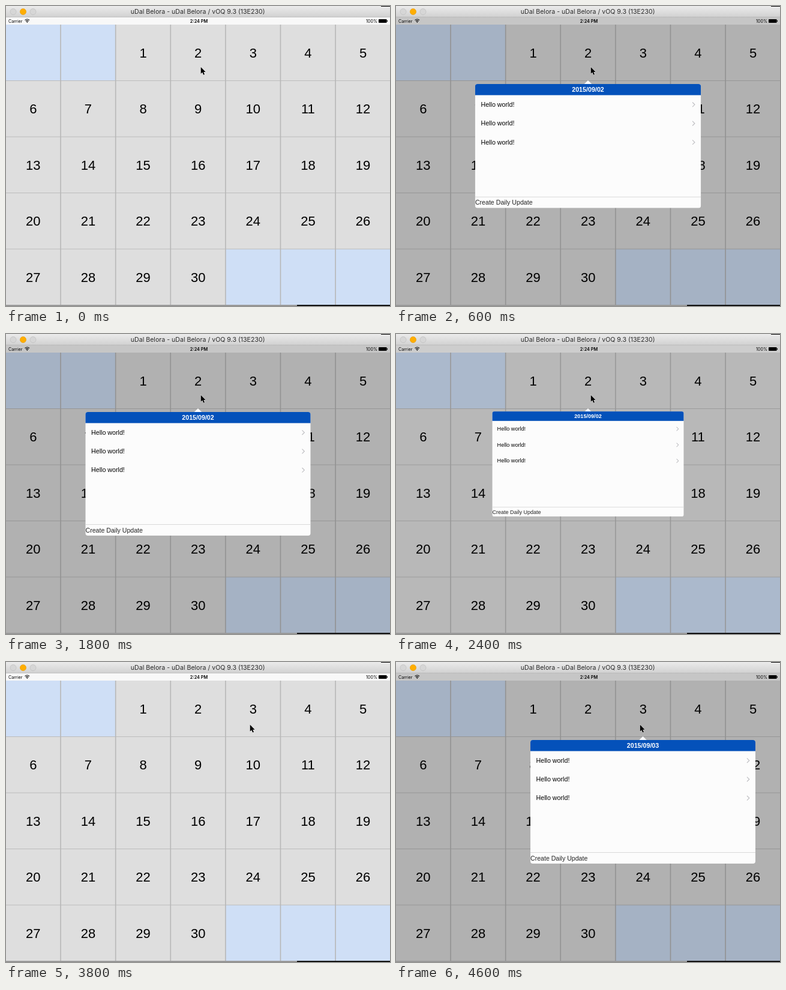
These frames come from a looping animation (640x500 px, 4.8 s). An HTML page:

```html
<!DOCTYPE html>
<html lang="en">
<head>
<meta charset="utf-8">
<title>Calendar popover</title>
<style>
  html, body { margin: 0; width: 100%; height: 100%; overflow: hidden; background: #dedede; }
  svg { display: block; }
  text { font-family: "Liberation Sans", Arial, sans-serif; }
  .ui { font-family: Inter, sans-serif; }
  .mid { text-anchor: middle; }
</style>
</head>
<body>
<svg width="640" height="500" viewBox="0 0 640 500">
  <defs>
    <linearGradient id="bar" x2="0" y2="1">
      <stop stop-color="#ebebeb"/><stop offset="1" stop-color="#d1d1d1"/>
    </linearGradient>
    <clipPath id="card"><rect x="-187.5" y="6" width="375" height="206" rx="4"/></clipPath>
  </defs>

  <g id="calendar"></g>

  <g id="status">
    <rect y="18" width="640" height="13" fill="#f8f8f8"/>
    <text class="ui" x="4" y="27.6" font-size="7.2">Carrier</text>
    <g fill="none" stroke="#000" stroke-width="1.2">
      <path d="M31.5 23.6Q35.3 20.4 39.1 23.6M33 25.4Q35.3 23.4 37.6 25.4"/>
    </g>
    <path d="M34 26.6Q35.3 25.5 36.6 26.6L35.3 28.1Z"/>
    <text class="ui mid" x="321.5" y="27.7" font-size="7.3" font-weight="600">2:24 PM</text>
    <text class="ui" x="619" y="27.6" font-size="7.2" text-anchor="end">100%</text>
    <rect x="621" y="22" width="13.6" height="6" rx="1"/>
    <rect x="635" y="23.8" width="1" height="2.4"/>
  </g>

  <rect id="dim" y="18" width="640" height="480"/>

  <g id="title">
    <rect width="640" height="18.5" fill="url(#bar)"/>
    <path d="M0 18.4H640" stroke="#b4b4b4" stroke-width=".7"/>
    <g fill="#d6d6d6" stroke="#bdbdbd" stroke-width=".7">
      <circle cx="12" cy="9.5" r="5"/>
      <circle cx="28.5" cy="9.5" r="5" fill="#ffae00" stroke="#e79a00"/>
      <circle cx="45" cy="9.5" r="5"/>
    </g>
    <text class="ui mid" x="319.7" y="13.4" font-size="10.6" fill="#2b2b2b">uDal Belora - uDal Belora / vOQ 9.3 (13E230)</text>
    <path d="M625 0H640V1H625Z"/>
  </g>
  <path d="M0 498H640V500H0Z" fill="#999"/>
  <path d="M485 498H640V500H485Z" fill="#111"/>

  <g id="popover">
    <path d="M-6.5 6.2L0 0L6.5 6.2Z" fill="#fcfcfc"/>
    <g clip-path="url(#card)">
      <rect x="-188" y="6" width="376" height="206" fill="#fcfcfc"/>
      <rect x="-188" y="6" width="376" height="18.5" fill="#0451ba"/>
      <path d="M-188 193.5H188" stroke="#d9d9d9"/>
    </g>
    <text id="date" class="mid" y="19.3" font-size="10.7" font-weight="700" fill="#fff"></text>
    <g id="rows"></g>
    <text x="-187.5" y="206.6" font-size="10.6" fill="#222">Create Daily Update</text>
  </g>

  <path id="cursor" d="M0 0V11.3L2.6 8.9L4.4 13L6.3 12.2L4.6 8.2H8Z" stroke="#fff" stroke-width=".9" paint-order="stroke"/>
</svg>
<script>
const $ = id => document.getElementById(id);
const LOOP = 4800, STEP = 200, COL = 91.62, ROW = 93.5, TOP = 31;

function drawCalendar() {
  let cells = '', lines = '', labels = '';
  for (let i = 0; i < 35; i++) {
    const x = i % 7 * COL - .5, y = TOP + Math.floor(i / 7) * ROW, day = i - 1;
    const inMonth = day >= 1 && day <= 30;
    cells += `<rect x="${x}" y="${y}" width="${COL + 1}" height="${ROW + 1}" fill="${inMonth ? '#dedede' : '#cfdff6'}"/>`;
    if (inMonth) labels += `<text class="mid" x="${x + COL / 2}" y="${y + 54.6}" font-size="22">${day}</text>`;
  }
  for (let c = 1; c < 7; c++) lines += `M${c * COL - .6} ${TOP}V498`;
  const columns = `<path d="${lines}" stroke="#b7b7b7" stroke-width="1.6"/>`;
  lines = '';
  for (let r = 1; r < 5; r++) lines += `M0 ${TOP + r * ROW}H640`;
  $('calendar').innerHTML = cells + `<path d="${lines}" stroke="#bcbcbc"/>` + columns + labels;
}

function drawRows() {
  $('rows').innerHTML = [40, 71.3, 102.6].map(y =>
    `<text x="-178" y="${y + 3.7}" font-size="10.7">Hello world!</text>
     <path d="M173.5 ${y - 3.6}l3.8 3.8l-3.8 3.8" fill="none" stroke="#bfbfc3" stroke-width="1.2"/>`).join('');
}

const clamp = v => Math.min(1, Math.max(0, v));
const smooth = v => v * v * (3 - 2 * v);

// Underdamped spring (damping ratio 0.8), t in seconds
function spring(t) {
  const w = 9.8, decay = 13.1;
  return 1 - Math.exp(-decay * t) * (Math.cos(w * t) + decay / w * Math.sin(w * t));
}

const visits = [
  { open: 140, close: 2330, end: 2800, x: 320, date: '2015/09/02' },
  { open: 3833, close: Infinity, end: LOOP, x: 411.5, date: '2015/09/03' }
];

function cursorAt(t) {
  if (t < 3000) return [324.7, 101.7];
  if (t < 3200) return [352, 106];
  return [406.7, 104.5];
}

function render(t) {
  const visit = visits.find(v => t >= v.open && t < v.end);
  $('popover').style.display = visit ? '' : 'none';
  let shade = 0;
  if (visit) {
    const age = t - visit.open, closing = smooth(clamp((t - visit.close) / 270));
    const scale = .104 + .896 * spring(age / 1000) * (1 - closing);
    shade = clamp(age / 213) * (1 - closing);
    $('popover').setAttribute('transform', `translate(${visit.x} 124) scale(${scale})`);
    $('date').textContent = visit.date;
  }
  $('dim').setAttribute('opacity', .205 * shade);
  $('cursor').setAttribute('transform', `translate(${cursorAt(t)})`);
}

function tick() {
  render(Math.floor(performance.now() % LOOP / STEP) * STEP);
  requestAnimationFrame(tick);
}

drawCalendar();
drawRows();
tick();
</script>
</body>
</html>
```
